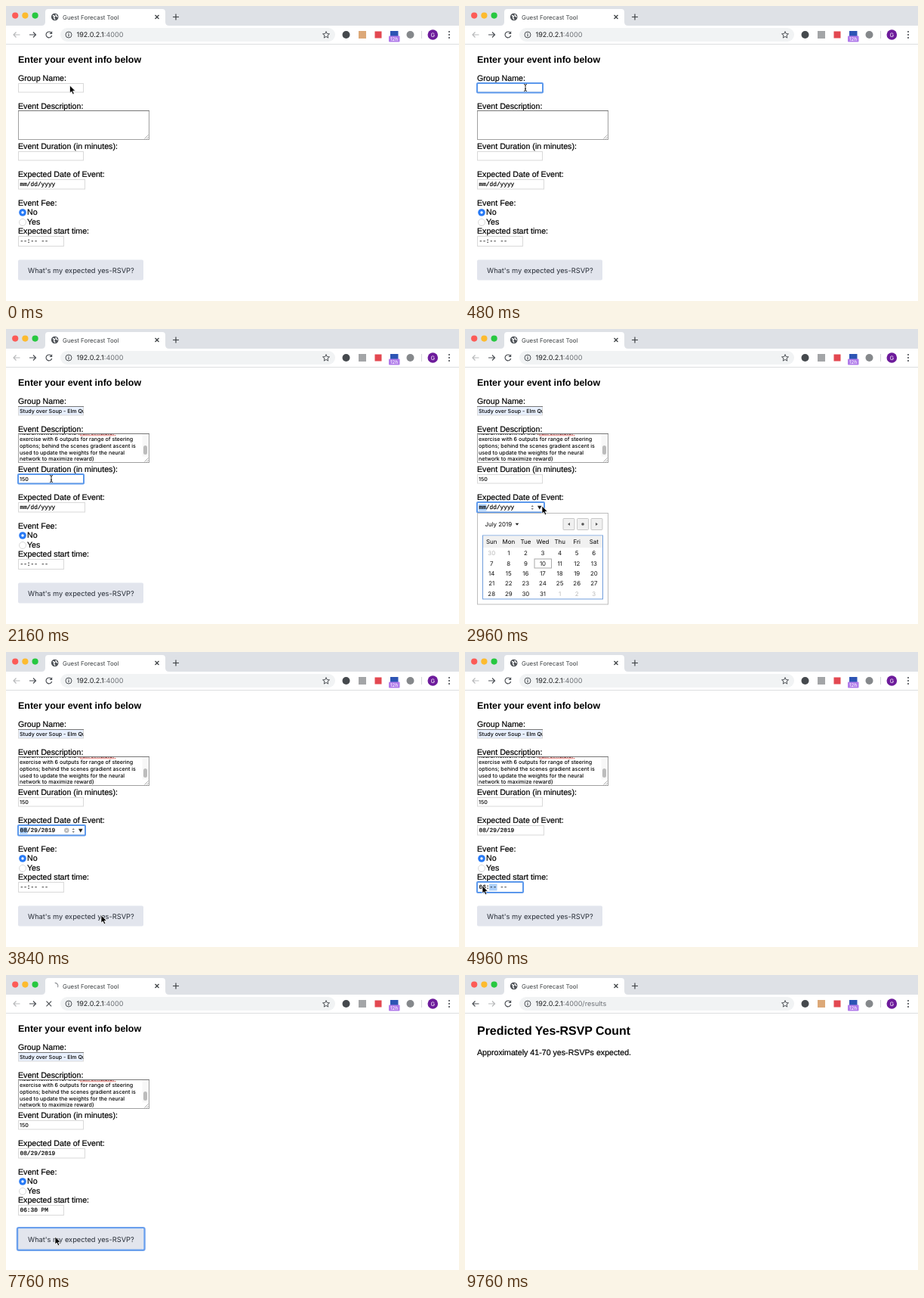
Animation, 600 px wide and 390 px high, one loop 9840 ms. Source, as an HTML page:

```html
<!DOCTYPE html>
<html lang="en">
<head>
<meta charset="utf-8">
<title>Guest forecast form</title>
<style>
  html, body { margin: 0; width: 100%; height: 100%; overflow: hidden; background: #fff; }
  svg { display: block; width: 100%; height: 100%; text-rendering: geometricPrecision; }
  text { font: 10.65px "Liberation Sans", Arial, sans-serif; fill: #000; white-space: pre; }
  .h3 { font-size: 12.45px; font-weight: bold; }
  .h2 { font-size: 15.95px; font-weight: bold; }
  .ui { font-family: Inter, sans-serif; font-size: 7.9px; }
  .field { font-family: Inter, sans-serif; font-size: 7.1px; font-weight: 500; }
  .mono { font: 7.8px "Liberation Mono", monospace; }
  .mono, #form > text:not([class]), #result > text:not([class]) { stroke: #000; stroke-width: .2; }
  .mid { text-anchor: middle; }
  .box { fill: #fff; stroke: #d9d9d9; }
  .ring { fill: none; stroke: #5b98ec; stroke-width: 2; }
  .mark { fill: #acd0fa; }
  .line { fill: none; stroke: #4d5156; stroke-width: 1.2; }
</style>
</head>
<body>
<svg viewBox="0 0 600 390">
  <defs>
    <clipPath id="groupClip"><rect x="17" y="102" width="85.5" height="13"/></clipPath>
    <clipPath id="areaClip"><rect x="17" y="139" width="164" height="37"/></clipPath>
    <path id="arrow" d="M4 -3.5L.5 0L4 3.5M.5 0H9"/>
  </defs>
  <rect width="600" height="390" fill="#fff"/>

  <!-- browser window -->
  <rect width="600" height="26" fill="#dee1e6"/>
  <circle cx="12.2" cy="12.6" r="4.1" fill="#fc5b57"/>
  <circle cx="25.4" cy="12.6" r="4.1" fill="#fdbb2f"/>
  <circle cx="38.6" cy="12.6" r="4.1" fill="#27c840"/>
  <path d="M47 26Q52 26 52 21V8Q52 4 56 4H207Q211 4 211 8V21Q211 26 216 26Z" fill="#fff"/>
  <g id="globe">
    <circle cx="64.7" cy="14.5" r="4.8" fill="#505459"/>
    <path d="M62 12.5L64.5 13.5L63.5 15.5L65 18M66 11L66.5 13L68.5 14.5" fill="none" stroke="#fff" stroke-width="1.4"/>
  </g>
  <path id="spin" fill="none" stroke="#8e9196" stroke-width="1.2"/>
  <text class="ui" x="75" y="17.5" style="fill:#3c4043">Guest Forecast Tool</text>
  <path class="line" d="M197.5 12L202.5 17M202.5 12L197.5 17M225 10.5V18.5M221 14.5H229" style="stroke:#3c4043"/>
  <use id="back" href="#arrow" x="9.5" y="38" class="line"/>
  <use id="next" href="#arrow" transform="translate(40 38) scale(-1 1)" class="line"/>
  <g id="reload">
    <path class="line" d="M59.8 35.2A3.9 3.9 0 1 0 60.7 39"/>
    <path d="M61.2 33.2V37H57.4Z" fill="#4d5156"/>
  </g>
  <path id="stop" class="line" d="M53.5 34.7L60.1 41.3M60.1 34.7L53.5 41.3"/>
  <rect x="72" y="29" width="364" height="18" rx="9" fill="#f1f3f4"/>
  <circle class="line" cx="83" cy="38" r="4" style="stroke-width:1"/>
  <path class="line" d="M83 37.3V40.3M83 35.4V36.4"/>
  <text class="ui" x="93.5" y="41.3" style="font-size:9.05px;fill:#1c1e20">192.0.2.1<tspan id="url" fill="#6b6f74"></tspan></text>
  <path id="star" class="line" style="stroke-width:1"/>
  <circle cx="450.5" cy="38" r="5" fill="#45494d"/>
  <rect id="ext" x="467" y="33" width="10" height="10"/>
  <rect x="488.5" y="33.5" width="9" height="9" fill="#e34851"/>
  <rect x="509" y="33" width="10.5" height="8" fill="#2c54b4"/>
  <rect x="507" y="39.5" width="14.5" height="8" rx="1" fill="#b07bea"/>
  <text class="ui mid" x="514.2" y="46" style="font-size:6.5px;fill:#fff">12h</text>
  <circle cx="535.5" cy="38" r="5" fill="#85888b"/>
  <path d="M550.5 33V43" stroke="#d3d6d9"/>
  <circle cx="565.3" cy="38" r="6.8" fill="#6d1b9b"/>
  <text class="ui mid" x="565.3" y="40.7" style="font-size:7.5px;fill:#fff">G</text>
  <g fill="#4d5156"><circle cx="587" cy="34" r="1.1"/><circle cx="587" cy="38" r="1.1"/><circle cx="587" cy="42" r="1.1"/></g>
  <path d="M0 50.5H600" stroke="#dcdee0"/>

  <g id="form">
    <text class="h3" x="16" y="75">Enter your event info below</text>
    <text x="16" y="99">Group Name:</text>
    <rect id="group" class="box" x="16.5" y="102.5" width="86" height="11.5"/>
    <g id="groupText">
      <path d="M16 102.5H103" stroke="#777"/>
      <text class="field" x="18" y="111" clip-path="url(#groupClip)">Study over Soup - Elm Quay</text>
    </g>
    <rect id="groupRing" class="ring" x="16" y="102" width="87" height="12.5" rx="1"/>

    <text x="16" y="135.7">Event Description:</text>
    <rect x="16.5" y="138.5" width="173" height="38" fill="#fff" stroke="#a0a0a0"/>
    <path d="M16 138.5H190" stroke="#777"/>
    <path d="M183.5 175.5L188.5 170.5M186.5 175.5L188.5 173.5" stroke="#888" stroke-width=".7"/>
    <rect id="blank" class="mark" x="17.5" y="139.5" width="38.5" height="9.5"/>
    <g id="about" clip-path="url(#areaClip)">
      <text class="field" x="18" y="139.6">neural network for the <tspan fill="#7c1c1c">walk simulator</tspan></text>
      <path d="M98 140.8H146" stroke="#d8443c" stroke-dasharray="1.3 .7"/>
      <text class="field" x="18" y="148.2">exercise with 6 outputs for range of steering</text>
      <text class="field" x="18" y="156.9">options; behind the scenes gradient ascent is</text>
      <text class="field" x="18" y="165.5">used to update the weights for the neural</text>
      <text class="field" x="18" y="174.1">network to maximize reward)</text>
    </g>
    <g id="bar">
      <rect x="180.5" y="139" width="8.5" height="29.5" fill="#f7f7f7"/>
      <rect x="182" y="154" width="5" height="12" rx="2.5" fill="#bcbcbc"/>
    </g>
    <rect id="areaRing" class="ring" x="16" y="138" width="174" height="39" rx="1" style="stroke:#427fd9"/>

    <text x="16" y="189">Event Duration (in minutes):</text>
    <rect class="box" x="16.5" y="192.5" width="86" height="11.5"/>
    <text id="length" class="field" x="18" y="201"></text>
    <rect id="lengthRing" class="ring" x="16" y="192" width="87" height="12.5" rx="1"/>

    <text x="16" y="225.8">Expected Date of Event:</text>
    <rect class="box" x="16.5" y="229.5" width="88" height="12.5"/>
    <rect id="dateMark" class="mark" x="18" y="231.5" width="10.5" height="9"/>
    <text id="date" class="mono" x="18.5" y="238.3"></text>
    <g id="dateTools">
      <path d="M87.5 235L89.2 233L90.9 235ZM87.5 237L89.2 239L90.9 237Z" fill="#777"/>
      <path d="M96 233.7H101.6L98.8 238.7Z" fill="#222"/>
      <rect class="ring" x="16" y="229" width="89" height="13.5" rx="1"/>
    </g>
    <g id="dateClear">
      <circle cx="80.3" cy="235.8" r="3.2" fill="#b5b5b5"/>
      <path d="M79 234.5L81.6 237.1M81.6 234.5L79 237.1" stroke="#fff" stroke-width=".8"/>
    </g>

    <text x="16" y="263.7">Event Fee:</text>
    <circle cx="22" cy="273" r="4.8" fill="#2779f5"/><circle cx="22" cy="273" r="1.7" fill="#fff"/>
    <text x="28" y="276">No</text>
    <circle cx="22" cy="286" r="4.5" class="box"/>
    <text x="28" y="289">Yes</text>
    <text x="16" y="301">Expected start time:</text>
    <rect class="box" x="16.5" y="304.5" width="60" height="13"/>
    <rect id="timeMark" class="mark" y="306.5" width="10.5" height="9"/>
    <text id="time" class="mono" x="18.5" y="313.3"></text>
    <rect id="timeRing" class="ring" x="16" y="304" width="61" height="14" rx="1"/>

    <rect x="16" y="335.5" width="166" height="27" rx="2" fill="#e2e5ed"/>
    <text class="ui" x="29" y="352.6" style="font-size:9.27px;fill:#262c36">What's my expected yes-RSVP?</text>
    <rect id="sendRing" class="ring" x="15" y="334.1" width="168.5" height="29.7" rx="2" style="stroke:#6a9fec;stroke-width:2.4"/>

    <g id="calendar">
      <rect x="16.5" y="243.5" width="173" height="120.5" fill="#fff" stroke="#bdbdbd"/>
      <text id="month" class="ui" x="26.5" y="261"></text>
      <path id="drop" d="M-2.3 256.8H2.3L0 259.8Z" fill="#222"/>
      <g fill="#f0f0f0" stroke="#bbb" stroke-width=".8">
        <rect x="130" y="250.5" width="15" height="15" rx="1"/><rect x="148.5" y="250.5" width="15" height="15" rx="1"/><rect x="167" y="250.5" width="15" height="15" rx="1"/>
      </g>
      <path d="M139 256V260L136 258ZM173 256V260L176 258Z" fill="#555"/>
      <circle cx="156" cy="258" r="1.8" fill="#555"/>
      <rect x="23.5" y="273" width="159" height="84" fill="#fff" stroke="#6f9ddc"/>
      <rect x="24" y="273.5" width="158" height="15.5" fill="#f1f1f1"/>
      <rect id="today" x="92" y="304" width="22.5" height="12" fill="none" stroke="#aaa"/>
      <g id="days"></g>
    </g>
  </g>

  <g id="result">
    <text class="h2" x="16" y="79.3">Predicted Yes-RSVP Count</text>
    <text x="16" y="105.7">Approximately 41-70 yes-RSVPs expected.</text>
  </g>

  <path id="pointer" d="M0 0V10L2.3 8L4 11.8L5.8 11L4.1 7.3H7.3Z" fill="#000" stroke="#fff" stroke-width=".7"/>
  <path id="beam" d="M-2 -4.5Q0 -4.5 0 -3V3Q0 4.5 -2 4.5M2 -4.5Q0 -4.5 0 -3M0 3Q0 4.5 2 4.5M-1 1.5H1" fill="none" stroke="#222"/>
</svg>
<script>
const LOOP = 9840, STEP = 80;
const SEND = 6080, LOADED = 8880;
const $ = id => document.getElementById(id);
const show = (id, on) => { $(id).style.display = on ? "" : "none"; };
const put = (id, text) => { $(id).textContent = text; };

// pointer stops: time, x, y
const path = [
  [0, 84.5, 105], [160, 80, 108], [800, 80, 108], [1040, 67, 153],
  [1440, 67, 153], [1760, 60, 198], [2240, 60, 198], [2640, 102, 234],
  [3040, 102, 234], [3280, 174, 256], [3360, 174, 256], [3680, 126, 348],
  [3920, 126, 348], [4320, 23, 309], [5600, 23, 309], [5920, 65, 346], [LOOP, 65, 346]
];

function pointerAt(t) {
  const i = path.findIndex(p => p[0] > t);
  const [t0, x0, y0] = path[i - 1], [t1, x1, y1] = path[i];
  const u = (t - t0) / (t1 - t0), k = u * u * (3 - 2 * u);
  return [x0 + (x1 - x0) * k, y0 + (y1 - y0) * k];
}

// latest value whose time has come
function latest(t, ...steps) {
  let value = "";
  for (const [at, v] of steps) if (t >= at) value = v;
  return value;
}

const polar = (cx, cy, r, deg) => {
  const a = deg * Math.PI / 180;
  return `${cx + r * Math.cos(a)} ${cy + r * Math.sin(a)}`;
};

$("star").setAttribute("d", "M" + Array.from({ length: 10 }, (_, i) =>
  polar(424, 38.3, i % 2 ? 2.1 : 4.7, i * 36 - 90)).join("L") + "Z");

const cells = [];
function cell(x, y, text) {
  const node = document.createElementNS("http://www.w3.org/2000/svg", "text");
  node.setAttribute("class", "ui mid");
  node.setAttribute("x", x);
  node.setAttribute("y", y);
  node.textContent = text;
  $("days").append(node);
  return node;
}
"Sun Mon Tue Wed Thu Fri Sat".split(" ").forEach((d, i) => cell(35.2 + i * 22.6, 284.3, d));
for (let i = 0; i < 35; i++)
  cells.push(cell(35.2 + i % 7 * 22.6, 299.2 + Math.floor(i / 7) * 13.4, ""));

function drawCalendar(august) {
  put("month", august ? "August 2019" : "July 2019");
  $("drop").setAttribute("transform", `translate(${august ? 80 : 69} 0)`);
  show("today", !august);
  const lead = august ? 4 : 1, before = august ? 31 : 30;
  cells.forEach((node, i) => {
    const day = i - lead + 1, inside = day > 0 && day < 32;
    node.textContent = day < 1 ? before + day : inside ? day : day - 31;
    node.style.fill = inside ? "#111" : "#b8b8b8";
  });
}

function drawSpinner(t) {
  const start = -90 - (t - SEND - STEP) / 1600 * 360;
  const sweep = 15 + 100 * Math.min(1, (t - SEND) / 700);
  $("spin").setAttribute("d",
    `M${polar(64.7, 14.5, 4.2, start)}A4.2 4.2 0 0 1 ${polar(64.7, 14.5, 4.2, start + sweep)}`);
}

function draw(t) {
  const within = (a, b) => t >= a && t < b;
  const done = t >= LOADED, busy = within(SEND, 9520);

  show("globe", !busy);
  show("spin", busy);
  if (busy) drawSpinner(t);
  show("reload", !busy);
  show("stop", busy);
  $("back").style.opacity = done ? 1 : .4;
  $("next").style.opacity = done ? .4 : 1;
  $("ext").style.fill = within(240, 9760) ? "#a3a5a7" : "#dca878";
  put("url", done ? ":4000/results" : ":4000");
  show("form", !done);
  show("result", done);

  show("groupRing", within(240, 1120));
  show("groupText", t >= 720);
  $("group").style.fill = t >= 720 ? "#e8f0fe" : "#fff";

  show("areaRing", within(1120, 1760));
  show("blank", within(1200, 1520));
  show("about", t >= 1520);
  show("bar", t >= 1520);

  show("lengthRing", within(1760, 2640));
  put("length", latest(t, [2000, "1"], [2080, "15"], [2160, "150"]));

  const picked = t >= 3760;
  put("date", picked ? "08/29/2019" : "mm/dd/yyyy");
  show("dateMark", within(2640, 4320));
  show("dateTools", within(2640, 4320));
  show("dateClear", within(3760, 4320));
  show("calendar", within(2720, 3760));
  drawCalendar(t >= 3360);

  put("time", latest(t, [0, "--:-- --"], [4640, "06:-- --"], [5040, "06:30 --"], [5440, "06:30 PM"]));
  show("timeRing", within(4320, 6000));
  show("timeMark", within(4320, 6000));
  $("timeMark").setAttribute("x", latest(t, [0, 18], [4720, 32], [5200, 46]));
  show("sendRing", t >= 6000);

  const beam = within(80, 880) || within(960, 2320);
  const [x, y] = pointerAt(t);
  show("beam", beam);
  show("pointer", !beam && t < 9200);
  for (const id of ["beam", "pointer"]) $(id).setAttribute("transform", `translate(${x} ${y})`);
}

const began = performance.now();
function tick() {
  const t = (performance.now() - began) % LOOP;
  draw(Math.floor(t / STEP) * STEP);
  requestAnimationFrame(tick);
}
tick();
</script>
</body>
</html>
```
